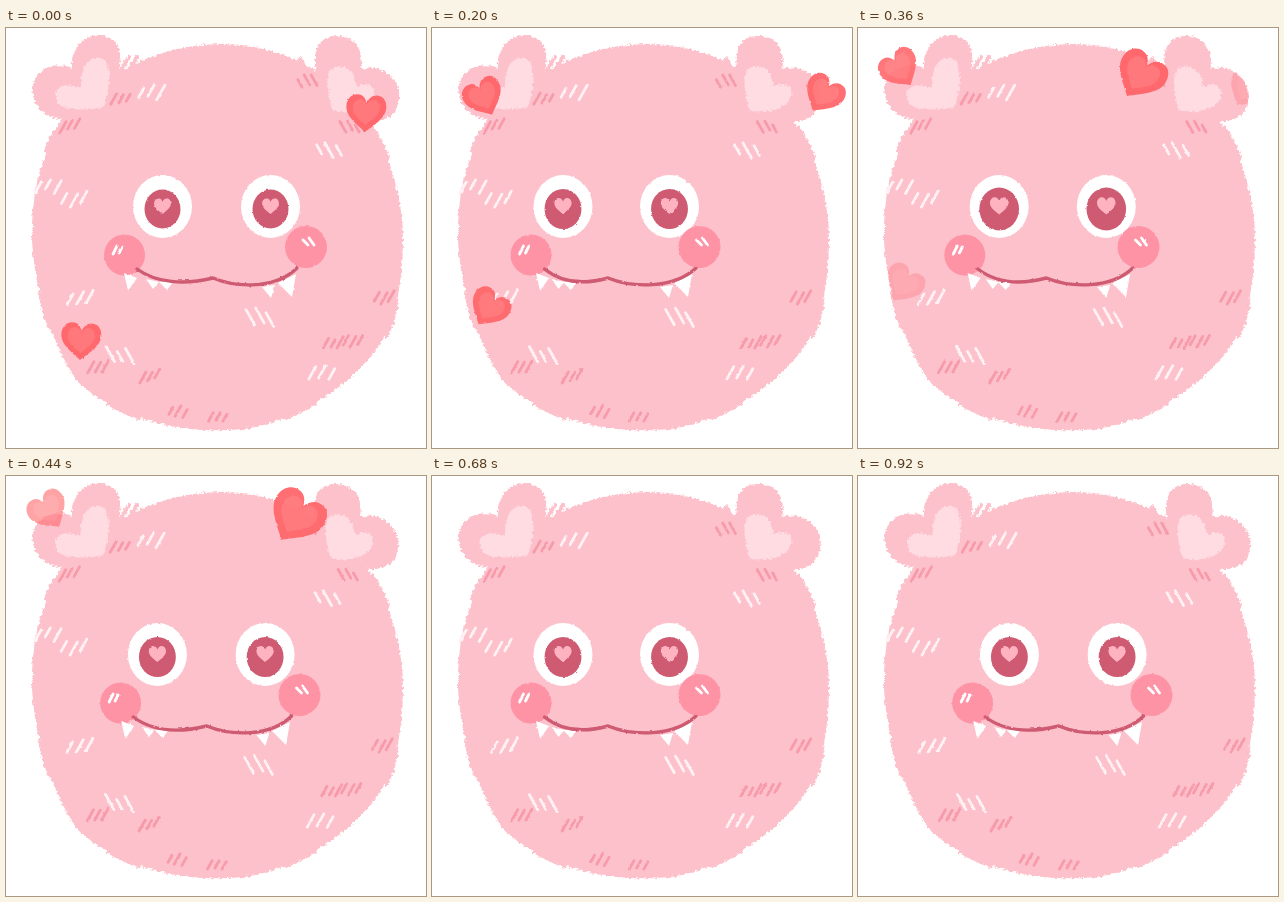
These frames come from a looping animation (420 by 420 pixels, 0.96 s). An HTML page:

```html
<!DOCTYPE html>
<html lang="en">
<head>
<meta charset="utf-8">
<title>Fluffy heart monster</title>
<style>
  html, body { margin: 0; width: 100%; height: 100%; overflow: hidden; background: #fff; }
  svg { display: block; width: 100vw; height: 100vh; }
  .line { fill: none; stroke-width: 2.8; stroke-linecap: round; stroke-linejoin: round; }
</style>
</head>
<body>
<svg viewBox="0 0 420 420">
  <defs>
    <filter id="rough" filterUnits="userSpaceOnUse" x="0" y="0" width="420" height="420" color-interpolation-filters="sRGB">
      <feTurbulence type="fractalNoise" baseFrequency=".35" numOctaves="2" seed="4"/>
      <feDisplacementMap in="SourceGraphic" scale="5" xChannelSelector="R" yChannelSelector="G"/>
    </filter>
    <filter id="soft" filterUnits="userSpaceOnUse" x="0" y="0" width="420" height="420" color-interpolation-filters="sRGB">
      <feTurbulence type="fractalNoise" baseFrequency=".3" seed="7"/>
      <feDisplacementMap in="SourceGraphic" scale="2.5" xChannelSelector="R" yChannelSelector="G"/>
    </filter>
    <clipPath id="silhouette"><use href="#body"/><use href="#earL"/><use href="#earR"/></clipPath>
    <path id="heart" d="M0 19C-8 12-20 5-20-6C-20-15-13-19-8-18C-4-18-1-14 0-10C2-15 6-19 11-18C17-18 20-12 20-6C20 4 8 12 0 19Z"/>
    <g id="eye">
      <ellipse rx="29.5" ry="31.5" fill="#fff"/>
      <g id="pupil">
        <ellipse rx="18" ry="19.5" fill="#ce5b71"/>
        <use href="#heart" fill="#ffb3c1" transform="translate(0 -3) scale(.42)"/>
      </g>
    </g>
  </defs>

  <g filter="url(#rough)" fill="#fdc1cb" stroke-width="4">
    <path id="body" d="M215 16C262 16 306 34 335 62C372 95 397 152 397 212C397 245 391 285 382 302C360 350 300 385 258 397C235 404 190 404 160 397C120 388 85 368 70 352C48 318 26 260 26 205C26 160 38 118 58 92C90 50 150 16 215 16Z"/>
    <path id="earL" d="M62 91C36 94 22 72 28 54C34 38 52 34 66 40C64 20 78 6 94 7C114 9 118 28 112 45L105 80Z"/>
    <path id="earR" data-rate=".9" d="M312 50C304 25 312 8 330 8C350 7 358 24 355 41C372 36 390 46 393 64C395 85 380 97 358 92L330 90Z"/>
    <path id="hairs" stroke="#fdc1cb" stroke-linecap="round" d="M112 48L123 29M122 44L131 29M301 45L294 31"/>
    <path fill="#ffdbe2" data-rate=".4" d="M98 79C80 82 53 85 50 70C47 58 61 54 75 60C75 40 81 28 95 30C107 34 104 60 98 79Z"/>
    <path fill="#ffdbe2" data-rate="1.8" d="M326 82C322 66 317 42 329 39C343 36 349 46 351 59C361 52 371 58 368 70C363 82 341 86 326 82Z"/>
  </g>

  <g filter="url(#soft)">
    <g id="fur"></g>
    <use href="#eye" data-rate="5.1" x="156.5" y="178.5"/>
    <use href="#eye" data-rate="5.4" x="264.5" y="178.5"/>
    <g fill="#ff93a6" stroke="#fff">
      <g data-rate="3.9"><circle cx="118.5" cy="227" r="20.5" stroke="none"/><path class="line" d="M107 226l4-8m2 7l3-6"/></g>
      <g data-rate="6.5"><circle cx="300" cy="219" r="21" stroke="none"/><path class="line" d="M297 212l5 5m1-7l5 7"/></g>
    </g>
    <g fill="#fff">
      <path data-rate="2.8" d="M118 245L131 250L122 263Z"/>
      <path data-rate="4.1" d="M140 251L153 254L147 261Z"/>
      <path data-rate="4.4" d="M153 254L167 254L161 262Z"/>
      <path data-rate="5.6" d="M256 259L269 257L265 270Z"/>
      <path data-rate="6" d="M272 255L290 246L286 269Z"/>
    </g>
    <path id="mouth" class="line" stroke="#ce5b71" style="stroke-width:3.4"/>
    <g id="hearts"></g>
  </g>
</svg>
<script>
const STEP = 40, LOOP = 960, LIFE = 360, FLIGHT_END = 560;
const $ = id => document.getElementById(id);

let seed = 11;
const random = () => (seed = seed * 16807 % 2147483647) / 2147483647;

// Three short strokes; lean -1 draws "/" and 1 draws "\"
function tuft(x, y, lean, color, size) {
  let d = '';
  for (let i = -1; i <= 1; i++) {
    const h = size * (.7 + .5 * random());
    const top = y + (random() - .5) * 5 - h / 2;
    d += `M${x + i * size * .75 - lean * h * .28} ${top}l${lean * h * .56} ${h}`;
  }
  $('fur').insertAdjacentHTML('beforeend',
    `<path class="line" stroke="${color}" data-rate="${x / 200}" d="${d}"/>`);
}
const white = lean => ([x, y]) => tuft(x, y, lean, '#fff1f4', 13);
const rose = lean => ([x, y]) => tuft(x, y, lean, '#f79bab', 9.5);
[[145, 65], [316, 345], [68, 171], [74, 270], [42, 158]].forEach(white(-1));
[[323, 122], [254, 290], [114, 327]].forEach(white(1));
[[64, 98], [115, 69], [92, 339], [144, 347], [172, 385], [212, 389], [327, 313], [347, 313], [378, 270]].forEach(rose(-1));
[[301, 53], [344, 99]].forEach(rose(1));

// Hairs hang down along both sides of the body
function addHairs() {
  const body = $('body'), length = body.getTotalLength();
  let d = $('hairs').getAttribute('d');
  for (const f of [.15, .3, .41]) {
    for (const side of [f, 1 - f]) {
      const down = side < .5 ? 1 : -1;
      for (let i = 0; i < 2; i++) {
        const a = body.getPointAtLength(side * length + down * i * 12);
        const b = body.getPointAtLength(side * length + down * (i * 12 + 8));
        d += `M${a.x} ${a.y}l${(b.x - a.x) * 2.8} ${(b.y - a.y) * 2.8}`;
      }
    }
  }
  $('hairs').setAttribute('d', d);
}
addHairs();

const flights = [
  { born: 0, x: 360, y: 85, drift: 34, rise: 24, bend: 2.1, tilt: 33, grow: 0 },
  { born: 0, x: 75, y: 313, drift: -42, rise: 100, bend: .8, tilt: 33, grow: 0 },
  { born: 120, x: 60, y: 88, drift: -18, rise: 54, bend: 2.1, tilt: -33, grow: 0 },
  { born: 240, x: 264, y: 60, drift: 28, rise: 24, bend: 2.1, tilt: 33, grow: .5 }
];
for (const flight of flights) {
  $('hearts').insertAdjacentHTML('beforeend',
    '<g><g><use href="#heart" fill="#ff696d"/><use href="#heart" fill="#ff787b" transform="translate(0 -1) scale(.68)"/></g></g>');
  flight.node = $('hearts').lastElementChild;
}

function fly({ node, born, x, y, drift, rise, bend, tilt, grow }, t) {
  const u = (t - born) / LIFE;
  const alive = u >= 0 && u <= 1 && t < FLIGHT_END;
  node.style.display = alive ? '' : 'none';
  if (!alive) return;
  const lift = Math.sin(.75 * bend * u);
  const opacity = 1 - .7 * u ** 5;
  node.setAttribute('opacity', opacity);
  node.setAttribute('clip-path', opacity < .5 ? 'url(#silhouette)' : 'none');
  node.firstElementChild.setAttribute('transform',
    `translate(${x + drift * Math.sin(bend * u)} ${y - rise * lift}) ` +
    `rotate(${tilt * Math.min(1, .1 + 3 * u)}) scale(${1 + grow * lift})`);
}

const movers = document.querySelectorAll('[data-rate]');

function draw(t) {
  // The face swings left and back twice per loop
  const phase = t / STEP % 12, turn = Math.min(phase, 12 - phase);
  for (const el of movers) el.setAttribute('transform', `translate(${-el.dataset.rate * turn})`);

  const swell = 1 + .1 * Math.sin(Math.PI * turn / 6) ** 2;
  $('pupil').setAttribute('transform', `translate(0 2.5) scale(${swell})`);

  const x = (start, rate) => start - rate * turn;
  $('mouth').setAttribute('d', `M${x(131, 3.7)} 241C${x(150, 4)} 255 ${x(178, 5.4)} 257 ${x(207, 6.2)} 250` +
    `C${x(231, 6.1)} 260 ${x(270, 5.7)} 261 ${x(291, 5.4)} 240`);

  for (const flight of flights) fly(flight, t);
}

const start = performance.now();
function tick() {
  draw(Math.floor((performance.now() - start) % LOOP / STEP) * STEP);
  requestAnimationFrame(tick);
}
tick();
</script>
</body>
</html>
```
